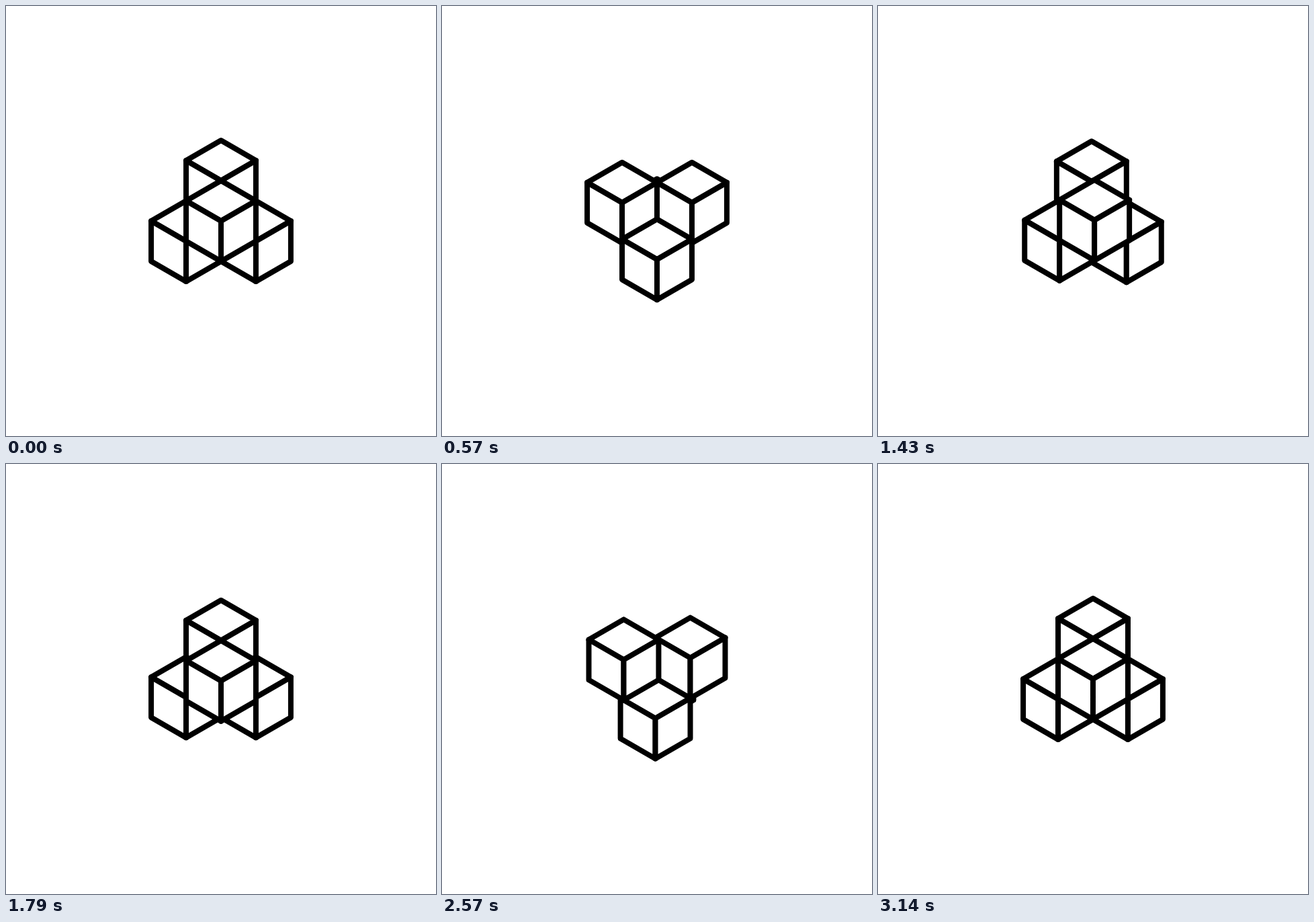
An HTML page with a canvas that plays this animation: 640 by 640 pixels, repeating every 3210 ms.

```html
<!DOCTYPE html>
<html lang="en">
<head>
<meta charset="utf-8">
<title>Shifting cubes</title>
<style>
  html, body { margin: 0; width: 100%; height: 100%; overflow: hidden; background: #fff; }
  canvas { display: block; width: 640px; height: 640px; }
</style>
</head>
<body>
<canvas id="stage" width="640" height="640"></canvas>
<script>
const ctx = document.getElementById("stage").getContext("2d");

const LOOP = 3210;
const FPS = 14;
const EDGE = 60;
const DX = EDGE * Math.cos(Math.PI / 6);
const DY = EDGE / 2;

// Moves in ticks: the midpoint of each, its last tick, and its length.
const MIDS = [5, 16.9, 28, 39];
const ENDS = [10.9, 22.5, 33.5, 45];
const SPAN = 11;

const easeInOut = t => t < 0.5 ? 4 * t ** 3 : 1 - 4 * (1 - t) ** 3;
const clamp = t => Math.min(1, Math.max(0, t));

// Isometric cells [x, y, z] with x to front right, y to front left, z up.
function layout(move, p) {
  const z = move % 2 ? 1 : p;
  const cubes = [
    [0, 0, 0.5 - z],  // back
    [0, 1, z - 0.5],  // left
    [1, 0, z - 0.5],  // right
    [1, 1, 0.5 - z]   // front
  ];
  if (move % 2) {
    const axis = move === 1 ? 1 : 0;
    for (const c of cubes) c[axis] += c[axis] ? -p : p;
  }
  return cubes;
}

function polygon(points) {
  ctx.beginPath();
  for (const [x, y] of points) ctx.lineTo(x, y);
  ctx.closePath();
  ctx.fill();
  ctx.stroke();
}

function drawCube([cx, cy, cz]) {
  const x = 320 + (cx - cy) * DX;
  const y = 230 + (cx + cy) * DY - cz * EDGE;
  const front = [x, y + 2 * DY];
  const bottom = [x, y + 2 * DY + EDGE];
  const left = [x - DX, y + DY];
  const right = [x + DX, y + DY];
  const drop = ([a, b]) => [a, b + EDGE];
  polygon([[x, y], right, front, left]);
  polygon([left, front, bottom, drop(left)]);
  polygon([right, front, bottom, drop(right)]);
}

function draw(time) {
  const tick = Math.min(44, Math.floor((time + 5) * FPS / 1000));
  const move = ENDS.findIndex(end => tick < end);
  const p = easeInOut(clamp((tick - MIDS[move]) / SPAN + 0.5));
  const depth = c => c[0] + c[1] + c[2];

  ctx.fillStyle = "#fff";
  ctx.fillRect(0, 0, 640, 640);
  ctx.strokeStyle = "#000";
  ctx.lineWidth = 8;
  ctx.lineJoin = "round";
  layout(move, p).sort((a, b) => depth(a) - depth(b)).forEach(drawCube);
}

const start = performance.now();
function loop() {
  draw((performance.now() - start) % LOOP);
  requestAnimationFrame(loop);
}
loop();
</script>
</body>
</html>
```
